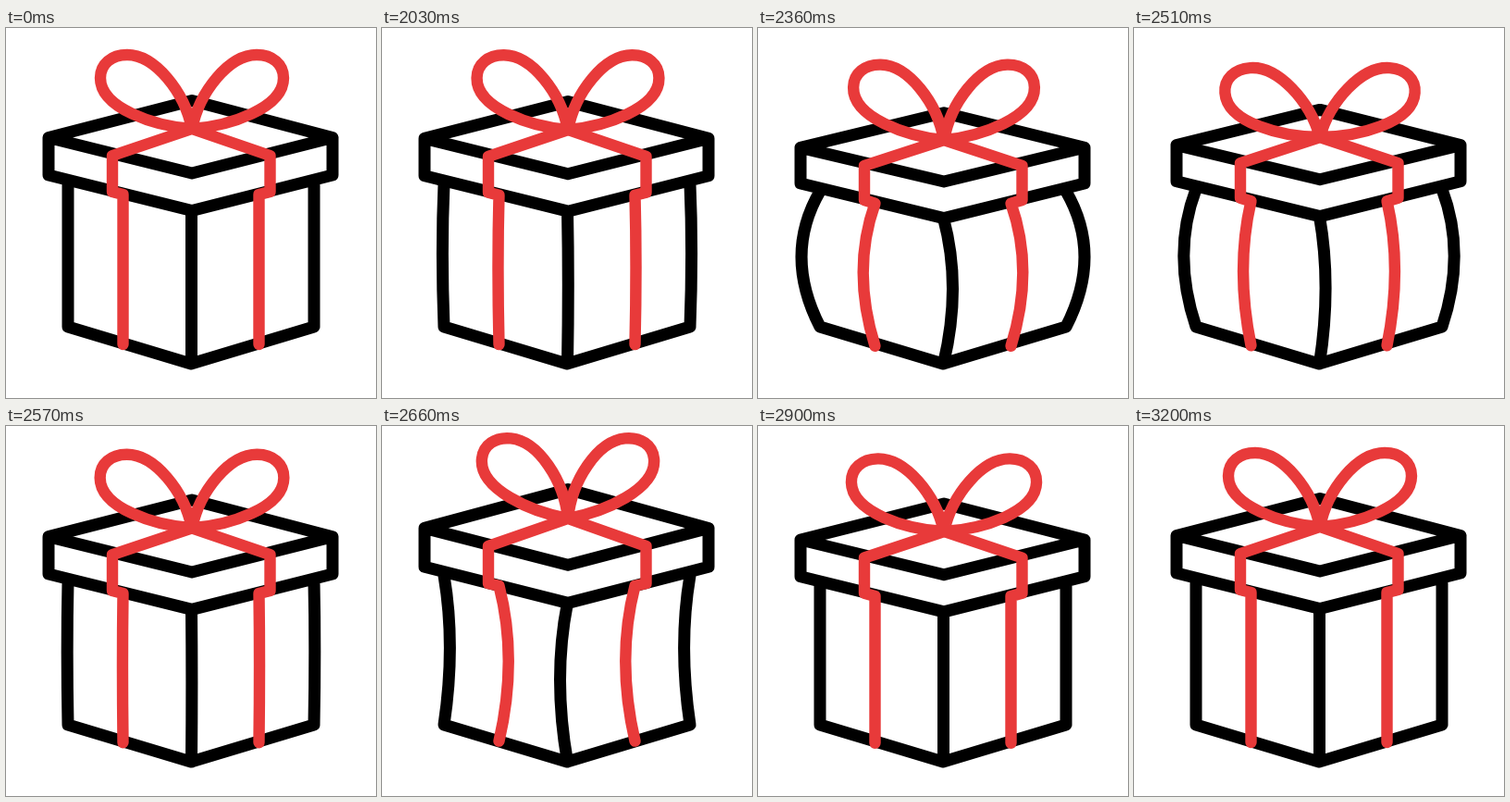
Write an HTML page that moves like this. It is 400x400 px and loops after 3230 ms.

```html
<!DOCTYPE html>
<html>
<head>
<meta charset="utf-8">
<title>Gift box</title>
<style>
  html, body { margin: 0; width: 100%; height: 100%; overflow: hidden; background: #fff; }
  svg { display: block; width: 100%; height: 100%; }
  path { fill: none; stroke-linecap: round; stroke-linejoin: round; }
</style>
</head>
<body>
<svg viewBox="0 0 400 400">
  <path id="box" stroke="#000" stroke-width="13"/>
  <path id="ribbon" stroke="#e83a3a" stroke-width="12.4"/>
</svg>
<script>
const LOOP = 3230, START = 2000, STEP = 30;
const box = document.getElementById('box');
const ribbon = document.getElementById('ribbon');

// time, lid drop, body bulge, upward tilt of the bow loops in radians
const keys = [
  [2000, 0, 0, 0],
  [2030, 1, 0.8, 0.01],
  [2210, 9, 8, 0.09],
  [2360, 12, 10, 0.02],
  [2510, 9, 6.6, -0.07],
  [2660, -9, -8, 0.1],
  [2900, 5, 0, -0.02],
  [3080, -3, 0, 0],
  [3200, 0, 0, 0]
];

// Smooth curve through the keys
function pose(t) {
  const last = keys.length - 1;
  if (t <= keys[0][0]) return keys[0].slice(1);
  if (t >= keys[last][0]) return keys[last].slice(1);
  const i = keys.findIndex(k => k[0] > t) - 1;
  const a = keys[i], b = keys[i + 1], span = b[0] - a[0];
  const u = (t - a[0]) / span;
  const slope = (n, c) => {
    if (n === 0 || n === last) return 0;
    const p = keys[n - 1], q = keys[n + 1];
    return (q[c] - p[c]) / (q[0] - p[0]) * span;
  };
  return [1, 2, 3].map(c => {
    const smooth = u * u * (3 - 2 * u);
    return a[c] + (b[c] - a[c]) * smooth
      + slope(i, c) * u * (1 - u) ** 2
      - slope(i + 1, c) * u * u * (1 - u);
  });
}

function draw(t) {
  const [drop, bulge, tilt] = pose(t);
  const y = (rest, follow) => rest + drop * follow;
  const side = bulge * (bulge > 0 ? 2 : 0.8);

  // Nearly vertical line whose middle is pushed sideways
  const bend = (x, top, bottom, push) =>
    `${x},${top} Q${x + 2 * push},${top + (bottom - top) * 0.47} ${x},${bottom}`;

  const back = y(78.5, 1.1), corner = y(118.5, 0.9), front = y(157, 0.75);
  const rim = y(159, 0.75), rimFront = y(197.5, 0.68), wall = y(168, 0.7);

  box.setAttribute('d',
    `M201,${back} L353,${corner} L201,${front} L46,${corner} Z
     M46,${corner} V${rim} L201,${rimFront} L353,${rim} V${corner}
     M${bend(67, wall, 323, -side)} L200,363 L333,323
     M${bend(333, wall, 323, side)}
     M${bend(200.5, rimFront, 363, bulge)}`);

  const knot = y(109, 1), cos = Math.cos(tilt), sin = Math.sin(tilt);
  const loop = dir => {
    const p = (px, py) =>
      `${201 + dir * (px * cos - py * sin)},${knot - px * sin - py * cos}`;
    return `M${p(0, 0)} C${p(40, 3)} ${p(99, 22)} ${p(99, 55)}
      C${p(99, 70)} ${p(87, 80)} ${p(70, 80)} C${p(40, 80)} ${p(8, 40)} ${p(0, 0)}`;
  };
  const strap = (outer, inner, dir) =>
    `M201,${knot} L${outer},${y(138, 0.9)} V${y(177, 0.75)}
     L${bend(inner, y(180, 0.8), y(342, 0.15), dir * bulge * 1.28)}`;

  ribbon.setAttribute('d',
    loop(-1) + loop(1) + strap(115, 126.5, -1) + strap(285.5, 273.5, 1));
}

function frame() {
  const t = performance.now() % LOOP;
  draw(START + Math.floor((t - START) / STEP) * STEP);
  requestAnimationFrame(frame);
}
frame();
</script>
</body>
</html>
```
